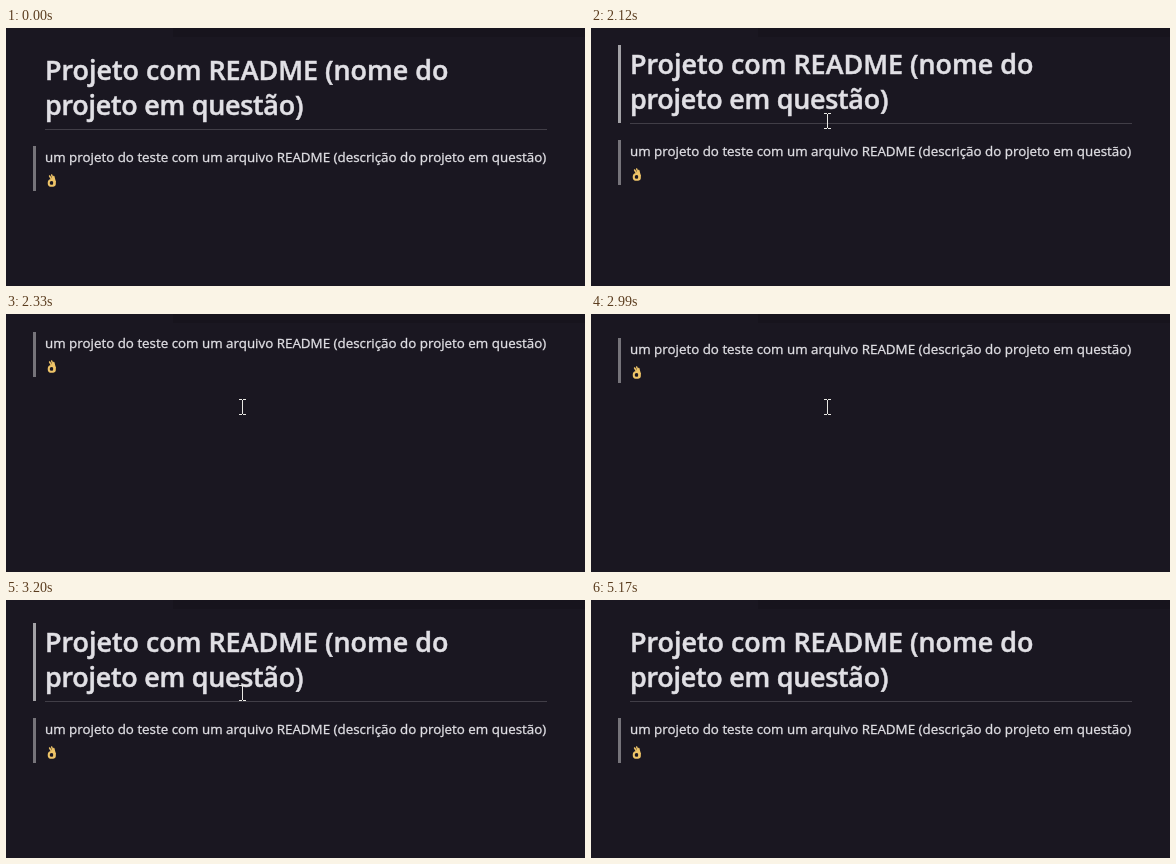
An HTML page for the animation above (6360 ms loop, 579 by 258 pixels).

```html
<!DOCTYPE html>
<html lang="pt">
<head>
<meta charset="utf-8">
<title>Pré-visualização do README</title>
<style>
  html, body { margin: 0; width: 100%; height: 100%; overflow: hidden; background: #1a1721; }
  svg { display: block; }
  text { font-family: "Open Sans", "Noto Sans", sans-serif; fill: #e1e0e5; stroke: #e1e0e5; }
  .title { font-size: 26.9px; font-weight: 600; stroke-width: .5px; }
  .tight { letter-spacing: -.25px; }
  .body { font-size: 13.37px; stroke-width: .3px; }
  .bar { fill: #fff; }

  .scroll, .cursor, .arrow, .beam, .title-bar, .body-bar {
    animation: 6360ms step-end infinite;
  }
  .scroll { animation-name: scroll; }
  .cursor { animation-name: move; }
  .arrow { animation-name: arrow; }
  .beam { animation-name: beam; }
  .title-bar { animation-name: title-hover; }
  .body-bar { animation-name: body-hover; }

  @keyframes scroll {
    0% { transform: translateY(0); }
    33.33% { transform: translateY(-6px); }
    34.43% { transform: translateY(-65px); }
    35.53% { transform: translateY(-94px); }
    36.63% { transform: translateY(-100px); }
    47.01% { transform: translateY(-94px); }
    48.11% { transform: translateY(-35px); }
    49.21% { transform: translateY(-6px); }
    50.31%, 100% { transform: translateY(0); }
  }
  @keyframes move {
    0% { transform: translate(436px, 270px); }
    9.27% { transform: translate(436px, 236px); }
    10.37% { transform: translate(396px, 196px); }
    11.47% { transform: translate(350px, 158px); }
    12.57% { transform: translate(306px, 130px); }
    13.67% { transform: translate(268px, 110px); }
    14.77% { transform: translate(244px, 97px); }
    15.72% { transform: translate(236px, 93px); }
    70.28% { transform: translate(252px, 103px); }
    71.38% { transform: translate(270px, 112px); }
    72.48% { transform: translate(300px, 127px); }
    73.58% { transform: translate(336px, 146px); }
    74.68% { transform: translate(374px, 166px); }
    75.78% { transform: translate(408px, 185px); }
    76.88% { transform: translate(438px, 203px); }
    77.98% { transform: translate(468px, 222px); }
    79.08% { transform: translate(495px, 240px); }
    80.18% { transform: translate(500px, 254px); }
    81.28%, 100% { transform: translate(500px, 270px); }
  }
  /* the pointer is an I-beam only over lines of text */
  @keyframes arrow {
    0%, 13.67%, 70.28%, 73.58%, 100% { opacity: 1; }
    12.57%, 14.77%, 72.48% { opacity: 0; }
  }
  @keyframes beam {
    0%, 13.67%, 70.28%, 73.58%, 100% { opacity: 0; }
    12.57%, 14.77%, 72.48% { opacity: 1; }
  }
  @keyframes title-hover {
    0%, 71.38%, 100% { opacity: 0; }
    14.77% { opacity: .6; }
  }
  @keyframes body-hover {
    0%, 13.67%, 74.68%, 100% { opacity: .4; }
    11.47%, 72.48% { opacity: .6; }
  }
</style>
</head>
<body>
<svg width="579" height="258" viewBox="0 0 579 258">
  <defs>
    <clipPath id="page"><rect y="9" width="579" height="249"/></clipPath>
  </defs>
  <rect width="579" height="258" fill="#1a1721"/>
  <rect x="167" width="412" height="9" fill="#17141d"/>

  <g clip-path="url(#page)">
    <g class="scroll">
      <rect class="bar title-bar" x="27" y="23" width="3" height="78"/>
      <text class="title" x="39" y="52">Projeto com README (nome do</text>
      <text class="title tight" x="39" y="87">projeto em questão)</text>
      <rect x="39" y="101" width="502" height="1" fill="#413e47"/>

      <rect class="bar body-bar" x="27" y="118" width="3" height="45"/>
      <text class="body" x="39" y="134">um projeto do teste com um arquivo README (descrição do projeto em questão)</text>

      <!-- OK hand -->
      <g fill="none" stroke="#eec468" stroke-linecap="round">
        <path d="M49 153.5 L47.8 148.6 M47.6 152.6 L45.7 147 M46 152 L43.6 148" stroke-width="1.5"/>
        <circle cx="45.6" cy="154.9" r="2.9" stroke-width="2"/>
        <path d="M48.6 153.6 L48.4 157" stroke-width="2.4"/>
      </g>
    </g>
  </g>

  <g class="cursor">
    <path class="arrow" d="M-.5 -.5 V15.5 L3.2 12 L5.6 17.5 L8 16.5 L5.7 11 H10.5 Z" fill="#fff" stroke="#000" stroke-width="1"/>
    <path class="beam" d="M-3 -7.5 H0 M1 -7.5 H4 M.5 -7 V7 M-3 7.5 H0 M1 7.5 H4" fill="none" stroke="#e9e8e4" stroke-width="1"/>
  </g>
</svg>
</body>
</html>
```
